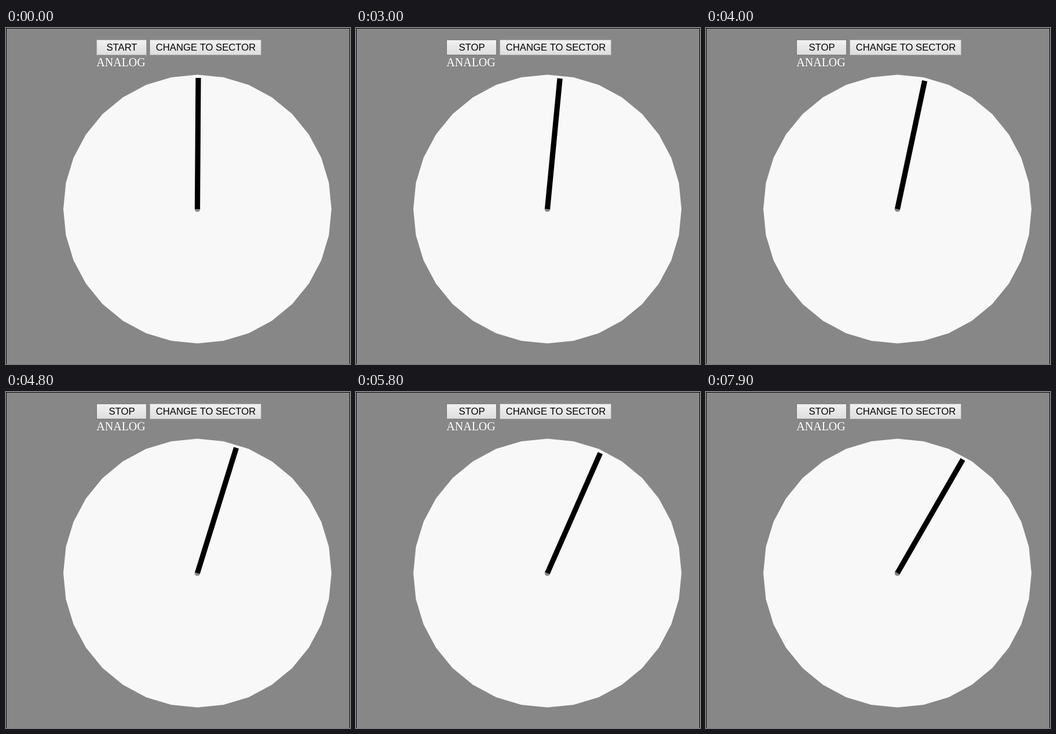
Write an HTML page with a canvas that moves like this. It is 594 px wide and 579 px high and loops after 8 s.

```html
<!DOCTYPE html>
<html lang="en">
<head>
<meta charset="utf-8">
<title>Analog timer</title>
<style>
html, body { margin: 0; width: 100%; height: 100%; overflow: hidden; background: #878787; }
canvas { display: block; }
</style>
</head>
<body>
<canvas id="stage" width="594" height="579"></canvas>
<script>
const ctx = document.getElementById('stage').getContext('2d');
const LOOP = 8000, TICK = 100;
const CX = 330.5, CY = 312, RADIUS = 231.5, SIDES = 32;
const HAND = 226, SPEED = 6.55;

// Degrees clockwise from the top; the timer runs, pauses, then resumes.
function handAngle(t) {
  const ran = Math.max(0, Math.min(t, 6078) - 2220) + Math.max(0, t - 7236);
  return 0.38 + ran / 1000 * SPEED;
}

function button(x, w, label, hover, pressed) {
  const y = 20, h = 27;
  const fill = ctx.createLinearGradient(0, y, 0, y + h);
  fill.addColorStop(0, pressed ? '#e2e2e2' : '#f2f2f2');
  fill.addColorStop(1, pressed ? '#eeeeee' : '#dddddd');
  ctx.fillStyle = fill;
  ctx.fillRect(x, y, w, h);
  ctx.strokeStyle = hover ? '#7a7a7a' : '#a6a6a6';
  ctx.lineWidth = 1;
  ctx.strokeRect(x + 0.5, y + 0.5, w - 1, h - 1);
  ctx.fillStyle = '#000';
  ctx.font = '16.67px "Liberation Sans", Arial, sans-serif';
  ctx.textAlign = 'center';
  ctx.fillText(label, x + w / 2 + 0.5, 39);
}

function face() {
  ctx.beginPath();
  for (let i = 0; i < SIDES; i++) {
    const a = i / SIDES * 2 * Math.PI;
    ctx.lineTo(CX + RADIUS * Math.cos(a), CY + RADIUS * Math.sin(a));
  }
  ctx.closePath();
  ctx.fillStyle = '#f8f8f8';
  ctx.fill();
}

function hand(degrees) {
  ctx.fillStyle = '#878787';
  ctx.beginPath();
  ctx.arc(CX, CY, 4.8, 0, 2 * Math.PI);
  ctx.fill();
  ctx.save();
  ctx.translate(CX, CY);
  ctx.rotate(degrees * Math.PI / 180);
  ctx.fillStyle = '#000';
  ctx.fillRect(-4.6, -HAND, 9.2, HAND);
  ctx.restore();
}

function draw(t) {
  ctx.fillStyle = '#878787';
  ctx.fillRect(0, 0, 594, 579);
  ctx.fillStyle = '#000';
  ctx.fillRect(0, 0, 594, 1);
  ctx.fillRect(0, 0, 1, 579);
  ctx.fillRect(593, 0, 1, 579);

  const running = (t >= 2300 && t < 6100) || t >= 7300;
  const onSector = t >= 6300 && t < 6800;
  const pressed = [2200, 6000, 7200].includes(t);
  button(156, 87, running ? 'STOP' : 'START', t >= 500 && !onSector, pressed);
  button(248, 193, 'CHANGE TO SECTOR', onSector, false);

  ctx.fillStyle = '#fff';
  ctx.font = '20px "Liberation Serif", "Times New Roman", serif';
  ctx.textAlign = 'left';
  ctx.fillText('ANALOG', 156.3, 66);

  face();
  hand(handAngle(t));
}

const start = performance.now();
function tick() {
  const t = (performance.now() - start) % LOOP;
  draw(Math.floor(t / TICK) * TICK);
  requestAnimationFrame(tick);
}
tick();
</script>
</body>
</html>
```
